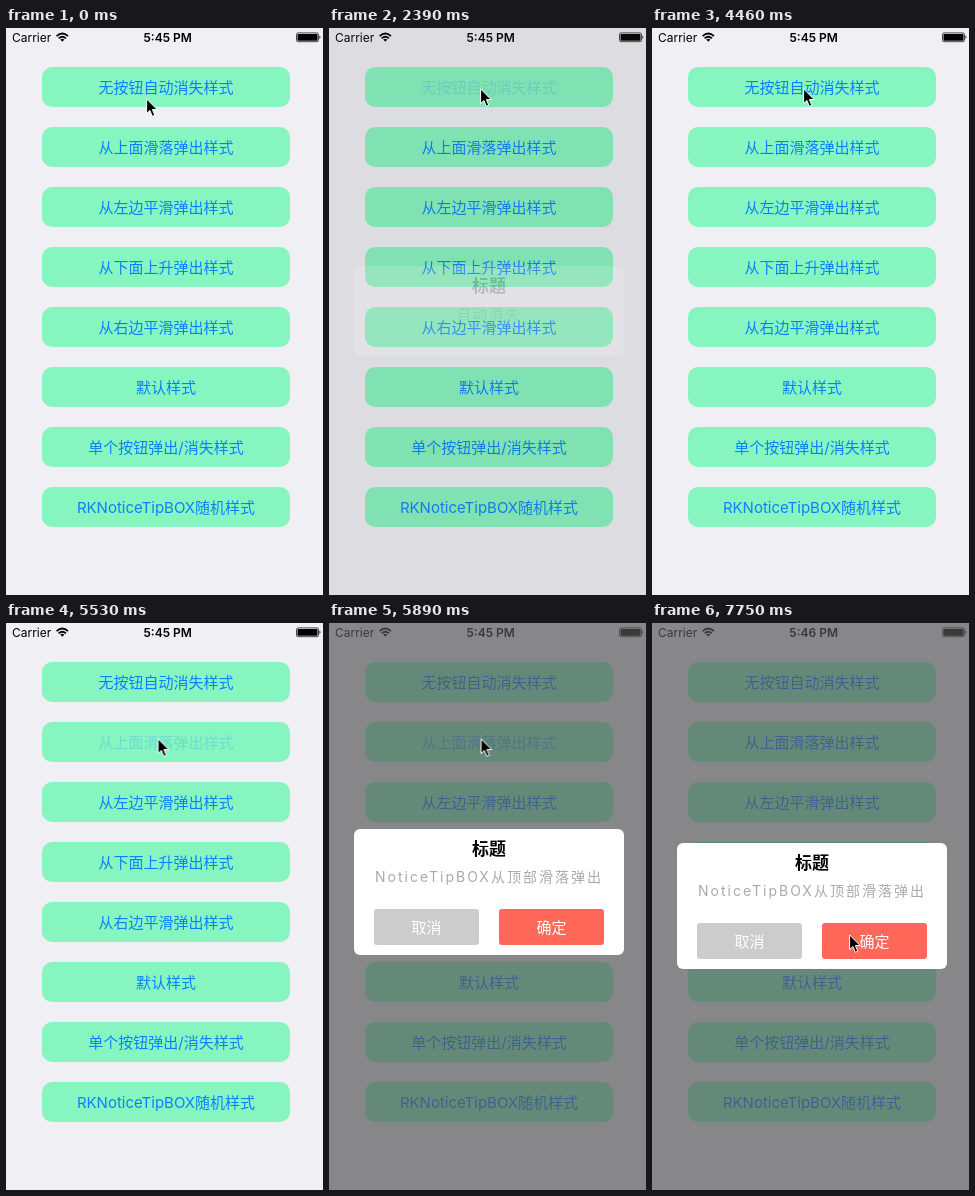
Animation, 317 px wide and 567 px high, one loop 8 s. Source, as an HTML page:

```html
<!DOCTYPE html>
<html lang="zh-CN">
<head>
<meta charset="utf-8">
<title>Alert styles</title>
<style>
html, body { margin: 0; width: 100%; height: 100%; overflow: hidden; background: #efeff4; }
svg { display: block; width: 317px; height: 567px; }
text { font: 15px Inter, "Noto Sans CJK SC", sans-serif; text-anchor: middle; }
.status text { font-size: 12px; }
.status .clock { font-weight: 600; }
.rows rect { fill: #86f5c0; }
.rows text { fill: #0a80ff; }
.card { fill: #fff; }
.title { font-size: 17px; font-weight: 600; }
.note { font-size: 14px; letter-spacing: 2px; text-anchor: start; fill: #aaa; }
.label { fill: #fff; }

/* every part holds its value until the next key, except in stepped moves */
.anim { animation: 8s step-end infinite; }
#cursor { animation-name: point; }
#row1 { animation-name: press1; }
#row2 { animation-name: press2; }
#dim { animation-name: dim; }
#toast { animation-name: toast; }
#dialog { animation-name: drop; }
#early { animation-name: early; }
#late { animation-name: late; }

@keyframes point {
  0% { transform: translate(140px, 70px); }
  6.75% { transform: translate(140px, 70px); animation-timing-function: steps(4, jump-both); }
  11% { transform: translate(148px, 63px); }
  17.75% { transform: translate(148px, 63px); animation-timing-function: steps(1, jump-both); }
  18.75% { transform: translate(151px, 60px); }
  60.25% { transform: translate(151px, 60px); animation-timing-function: steps(5, jump-both); }
  65.75% { transform: translate(151.5px, 115px); }
  89.125% { transform: translate(151.5px, 115px); animation-timing-function: steps(7, jump-both); }
  96.875%, 100% { transform: translate(197px, 311px); }
}
@keyframes press1 {
  0% { opacity: 1; }
  26.625% { opacity: .2; }
  28.875% { opacity: .2; animation-timing-function: steps(5); }
  34.375%, 100% { opacity: 1; }
}
@keyframes press2 {
  0% { opacity: 1; }
  69.125% { opacity: .2; }
  71.375% { opacity: .2; animation-timing-function: steps(5); }
  76.875%, 100% { opacity: 1; }
}
@keyframes dim {
  0% { opacity: 0; }
  28.875% { opacity: 0; animation-timing-function: steps(5, jump-both); }
  34.375% { opacity: 1; }
  55.75% { opacity: 0; }
  71.375%, 100% { opacity: 1; }
}
@keyframes toast {
  0% { opacity: 0; }
  28.875% { opacity: 0; animation-timing-function: steps(5, jump-both); }
  34.375% { opacity: 1; }
  55.75%, 100% { opacity: 0; }
}
/* damped spring from above the stage */
@keyframes drop {
  0% { transform: translate(0, -360px); }
  71.375% { transform: translate(0, -276px); }
  72.5% { transform: translate(0, -114px); }
  73.625% { transform: translate(0, -14px); }
  74.75% { transform: translate(0, 15px); }
  75.875% { transform: translate(0, 13px); }
  76.875% { transform: translate(0, 6px); }
  78% { transform: translate(0, 0); }
  79.125% { transform: translate(0, -1px); }
  80.25%, 100% { transform: translate(0, 0); }
}
@keyframes early {
  0% { opacity: 1; }
  85.875%, 100% { opacity: 0; }
}
@keyframes late {
  0% { opacity: 0; }
  85.875%, 100% { opacity: 1; }
}
</style>
</head>
<body>
<svg viewBox="0 0 317 567" width="317" height="567">
  <rect width="317" height="567" fill="#efeff4"/>

  <g class="status">
    <text x="6" y="13.6" style="text-anchor:start">Carrier</text>
    <g fill="none" stroke="#000" stroke-width="1.8">
      <path d="M50.6 8.1Q56.3 3 62 8.1"/>
      <path d="M52.7 10.3Q56.3 7.1 59.9 10.3"/>
    </g>
    <path d="M54.3 11.6Q56.3 10 58.3 11.6L56.3 13.8Z"/>
    <text id="early" class="clock anim" x="161.7" y="13.6">5:45 PM</text>
    <text id="late" class="clock anim" x="161.7" y="13.6">5:46 PM</text>
    <rect x="290.5" y="4.9" width="22" height="8.8" rx="1.6" fill="none" stroke="#000" stroke-width=".7"/>
    <rect x="291.5" y="5.9" width="20" height="6.8" rx=".8"/>
    <path d="M313.5 7.6Q315.4 9.3 313.5 11Z"/>
  </g>

  <g class="rows">
    <rect x="36" y="39" width="248" height="40" rx="10"/>
    <rect x="36" y="99" width="248" height="40" rx="10"/>
    <rect x="36" y="159" width="248" height="40" rx="10"/>
    <rect x="36" y="219" width="248" height="40" rx="10"/>
    <rect x="36" y="279" width="248" height="40" rx="10"/>
    <rect x="36" y="339" width="248" height="40" rx="10"/>
    <rect x="36" y="399" width="248" height="40" rx="10"/>
    <rect x="36" y="459" width="248" height="40" rx="10"/>
    <text id="row1" class="anim" x="160" y="64.7">无按钮自动消失样式</text>
    <text id="row2" class="anim" x="160" y="124.7">从上面滑落弹出样式</text>
    <text x="160" y="184.7">从左边平滑弹出样式</text>
    <text x="160" y="244.7">从下面上升弹出样式</text>
    <text x="160" y="304.7">从右边平滑弹出样式</text>
    <text x="160" y="364.7">默认样式</text>
    <text x="160" y="424.7">单个按钮弹出/消失样式</text>
    <text x="160" y="484.7">RKNoticeTipBOX随机样式</text>
  </g>

  <rect id="dim" class="anim" width="317" height="567" fill="rgba(85,85,85,.67)"/>

  <g id="toast" class="anim">
    <rect class="card" x="25" y="238" width="270" height="90" rx="6"/>
    <text class="title" x="160" y="264.3">标题</text>
    <text class="note" x="128" y="291.3">自动消失</text>
  </g>

  <g id="dialog" class="anim">
    <rect class="card" x="25" y="220" width="270" height="126" rx="6"/>
    <text class="title" x="160" y="246.3">标题</text>
    <text class="note" x="46" y="273.3">NoticeTipBOX从顶部滑落弹出</text>
    <rect x="45" y="300" width="105" height="36" rx="3" fill="#ccc"/>
    <rect x="170" y="300" width="105" height="36" rx="3" fill="#ff6759"/>
    <text class="label" x="97.5" y="323.6">取消</text>
    <text class="label" x="222.5" y="323.6">确定</text>
  </g>

  <path id="cursor" class="anim" d="M.6 .9V15.6L3.9 12.5L6.3 18.3L8.8 17.2L6.4 11.6H11.2Z" stroke="#fff" stroke-width="1"/>
</svg>
</body>
</html>
```
